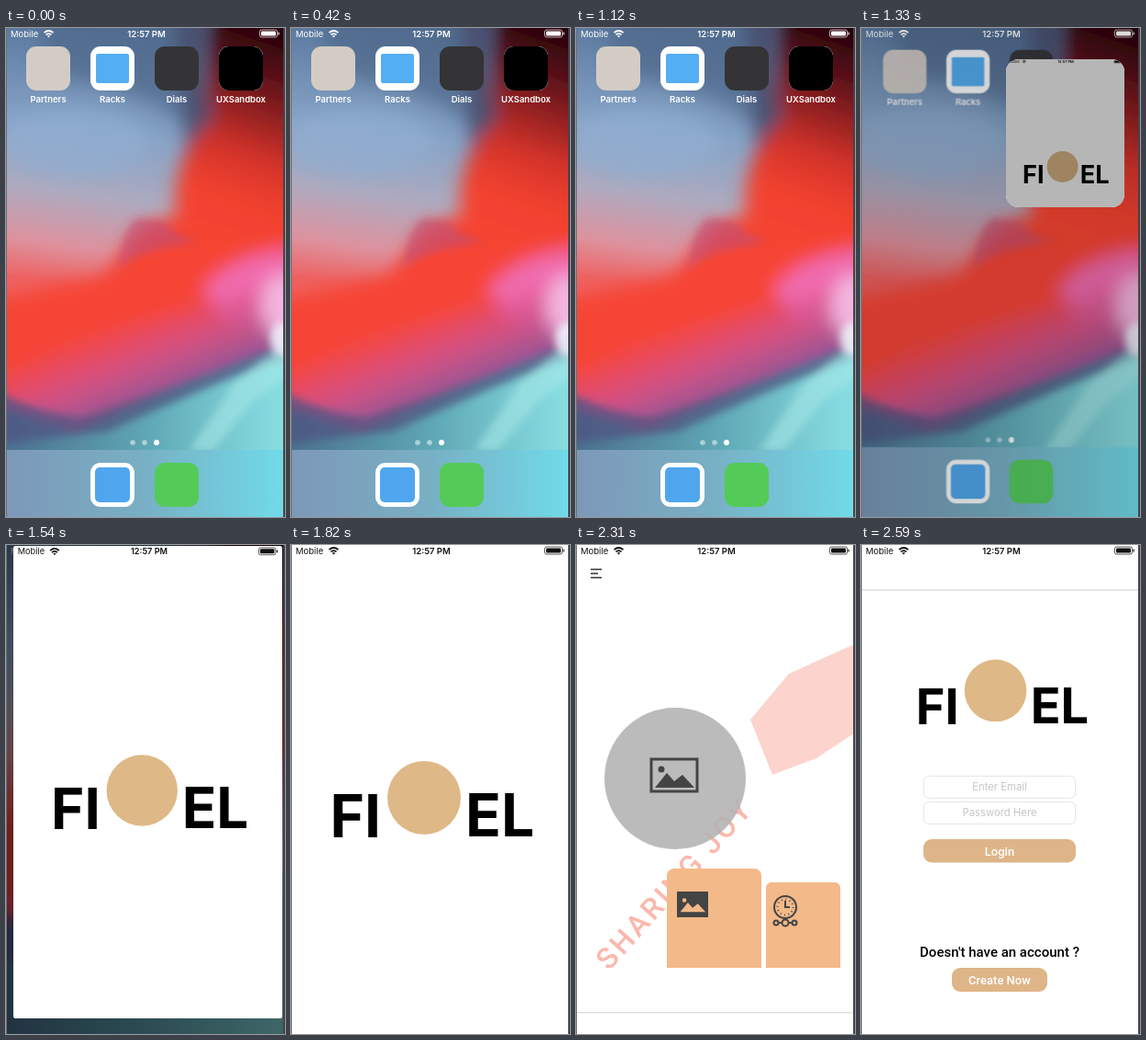
An HTML page without scripts that plays this animation: 304x532 px, repeating every 3220 ms.

```html
<!DOCTYPE html>
<html lang="en">
<head>
<meta charset="utf-8">
<title>App launch</title>
<style>
  html, body { margin: 0; width: 100%; height: 100%; overflow: hidden; background: #fff; }
  .stage { position: relative; width: 304px; height: 532px; overflow: hidden; }
  .stage > *, .window > * { position: absolute; }
  svg { display: block; left: 0; top: 0; }
  text { font-family: Inter, "Liberation Sans", sans-serif; }

  .icons, .dim, .window, .veil, .page, .login { animation: 3220ms linear infinite; }

  .icons { transform-origin: 152px 266px; animation-name: recede; }
  .dim { inset: 0; background: #000; animation-name: dim; }
  .window { overflow: hidden; background: #fff; animation-name: open; }
  .window svg { width: 100%; height: 100%; }
  .veil { inset: 0; background: #000; animation-name: unveil; }
  .page { animation-name: appear; }
  .login { animation-name: rise; }
  .edge { top: 0; height: 100%; }
  .left { left: 0; width: 1px; background: #6c7078; }
  .right { right: 0; width: 2px; background: #45424a; }

  .label { font-size: 9.5px; font-weight: 600; fill: #fff; text-anchor: middle; }
  .status { font-size: 9.5px; }
  .brand { font: 700 64px Lato, sans-serif; }
  .din { font-family: Roboto, sans-serif; font-weight: 500; }
  .mid { text-anchor: middle; }

  @keyframes recede {
    0%, 36.957% { transform: none; opacity: 1; }
    41.304% { transform: scale(.985); opacity: .95; }
    47.826%, 100% { transform: scale(.93); opacity: 0; }
  }
  @keyframes dim {
    0%, 36.957% { opacity: 0; }
    41.304% { opacity: .14; }
    47.826%, 100% { opacity: .54; }
  }
  @keyframes open {
    0%, 36.957% { left: 232px; top: 20px; width: 48px; height: 48px; border-radius: 11px;
      animation-timing-function: ease-in; }
    41.304% { left: 159px; top: 34px; width: 128px; height: 159px; border-radius: 14px; }
    47.826% { left: 8px; top: 1px; width: 293px; height: 514px; border-radius: 3px;
      animation-timing-function: ease-out; }
    54.348%, 100% { left: 0; top: 0; width: 303px; height: 532px; border-radius: 0; }
  }
  @keyframes unveil {
    0%, 36.957% { opacity: 1; }
    41.304% { opacity: .29; }
    45.652%, 100% { opacity: 0; }
  }
  @keyframes appear {
    0%, 63.043% { opacity: 0; }
    65.217% { opacity: .22; }
    71.739%, 100% { opacity: 1; }
  }
  @keyframes rise {
    0%, 70.807% { transform: translateY(532px); animation-timing-function: cubic-bezier(.3, .3, .2, 1); }
    80.435%, 100% { transform: none; }
  }
</style>
</head>
<body>
<div class="stage">
  <svg width="304" height="532" viewBox="0 0 304 532">
    <defs>
      <filter id="soft" x="-20%" y="-20%" width="140%" height="140%"><feGaussianBlur stdDeviation="10"/></filter>
      <filter id="fine" x="-20%" y="-20%" width="140%" height="140%"><feGaussianBlur stdDeviation="4"/></filter>
      <linearGradient id="sky" gradientUnits="userSpaceOnUse" x1="110" y1="0" x2="70" y2="280">
        <stop offset="0" stop-color="#56749a"/>
        <stop offset=".4" stop-color="#86a3c6"/>
        <stop offset=".65" stop-color="#aeaabf"/>
        <stop offset=".85" stop-color="#dd929e"/>
        <stop offset="1" stop-color="#ee6262"/>
      </linearGradient>
      <linearGradient id="fire" gradientUnits="userSpaceOnUse" x1="300" y1="0" x2="215" y2="250">
        <stop offset="0" stop-color="#220009"/>
        <stop offset=".2" stop-color="#581019"/>
        <stop offset=".55" stop-color="#d6342b"/>
        <stop offset=".75" stop-color="#f3432f"/>
        <stop offset="1" stop-color="#f64434"/>
      </linearGradient>
      <linearGradient id="dusk" gradientUnits="userSpaceOnUse" x1="135" y1="305" x2="175" y2="405">
        <stop offset="0" stop-color="#e04f80" stop-opacity="0"/>
        <stop offset=".5" stop-color="#d4528c" stop-opacity=".85"/>
        <stop offset="1" stop-color="#86589c"/>
      </linearGradient>
      <linearGradient id="sea">
        <stop offset=".1" stop-color="#4c7290"/>
        <stop offset=".5" stop-color="#5ea6b4"/>
        <stop offset=".9" stop-color="#86dce0"/>
      </linearGradient>
      <linearGradient id="dock">
        <stop offset="0" stop-color="#7d97b8"/>
        <stop offset=".5" stop-color="#78b0c4"/>
        <stop offset="1" stop-color="#70dcea"/>
      </linearGradient>

      <g id="status" class="status" fill="currentColor">
        <text x="5" y="9.5">Mobile</text>
        <path d="M41.5 5.2Q46.5 .8 51.5 5.2M43.5 7.4Q46.5 4.8 49.5 7.4" fill="none" stroke="currentColor" stroke-width="1.7"/>
        <path d="M44.9 8.7Q46.5 7.4 48.1 8.7L46.5 10.4Z"/>
        <text class="mid" x="153" y="9.5" font-weight="600">12:57 PM</text>
        <rect x="276.5" y="2" width="19" height="8" rx="2" fill="none" stroke="currentColor" stroke-width=".7"/>
        <rect x="278" y="3.4" width="16" height="5.2" rx="1"/>
        <rect x="296.5" y="4.5" width="1.2" height="3" rx=".6"/>
      </g>

      <g id="brand" class="brand">
        <text x="98" y="318" text-anchor="end">FI</text>
        <circle cx="145" cy="275" r="40" fill="#deb887"/>
        <text x="190" y="317">EL</text>
      </g>

      <g id="picture">
        <path d="M4 30L17 14L25 23L34 16L47 30Z"/>
        <circle cx="11" cy="10" r="3.5"/>
      </g>
      <rect id="tile" width="48" height="48" rx="11"/>
    </defs>

    <rect width="304" height="532" fill="url(#sky)"/>
    <g filter="url(#soft)">
      <path d="M40 -30H200V110Q150 60 40 50Z" fill="#50688a" opacity=".7"/>
      <ellipse cx="75" cy="125" rx="80" ry="38" fill="#90aed2" opacity=".7"/>
      <path d="M-40 300L105 270L150 215L185 205Q178 150 218 100L222 -30H340V370L180 400Q90 430 -40 415Z" fill="url(#fire)"/>
      <path d="M180 -30H222Q204 50 226 95L196 135Q196 60 180 -30Z" fill="#49506f"/>
      <path d="M215 285Q250 238 340 240V335L240 320Z" fill="#f06cae"/>
      <path d="M-40 400L60 345L210 300L340 270V350L190 400L60 445L-40 425Z" fill="url(#dusk)"/>
      <ellipse cx="302" cy="302" rx="24" ry="34" fill="#f3b6e0"/>
    </g>
    <g filter="url(#fine)">
      <path d="M122 262Q128 212 145 207L172 210Q185 228 212 232Q170 238 150 246Q135 250 122 262Z" fill="#c44f74" opacity=".65"/>
      <path d="M330 338Q210 375 75 440L-30 405V570H330Z" fill="url(#sea)"/>
      <path d="M-30 385Q30 418 80 424Q190 390 330 332V348Q210 395 110 440L-30 455Z" fill="#4f5582" opacity=".75"/>
      <path d="M312 335L250 385L200 460H225L270 405L312 375Z" fill="#a5e8e8" opacity=".6"/>
      <ellipse cx="302" cy="338" rx="14" ry="18" fill="#eef0fa" opacity=".9"/>
    </g>

    <g class="icons">
      <rect x="-6" y="459" width="316" height="80" fill="url(#dock)"/>
      <use href="#tile" x="22" y="20" fill="#d3ccc5"/>
      <use href="#tile" x="92" y="20" fill="#fff"/>
      <rect x="98" y="28" width="36" height="32" rx="2" fill="#54aef3"/>
      <use href="#tile" x="162" y="20" fill="#343436"/>
      <use href="#tile" x="92" y="473" fill="#fff"/>
      <rect x="97" y="478" width="38" height="38" rx="5" fill="#4fa6ee"/>
      <use href="#tile" x="162" y="473" fill="#54cb58"/>
      <g class="label">
        <text x="46" y="81">Partners</text>
        <text x="116" y="81">Racks</text>
        <text x="186" y="81">Dials</text>
        <text x="256" y="81">UXSandbox</text>
      </g>
      <g fill="#fff">
        <circle cx="138" cy="451" r="2.8" opacity=".5"/>
        <circle cx="151" cy="451" r="2.8" opacity=".5"/>
        <circle cx="164" cy="451" r="3"/>
      </g>
    </g>
    <use href="#status" color="#fff"/>
  </svg>

  <div class="dim"></div>

  <div class="window">
    <svg viewBox="0 0 303 532" preserveAspectRatio="xMidYMin slice">
      <rect width="303" height="532" fill="#fff"/>
      <use href="#brand"/>

      <g class="page">
        <rect width="303" height="532" fill="#fff"/>
        <g fill="#fbb8ac">
          <path d="M190 190L232 140L303 108V205L262 232L214 250Z" opacity=".6"/>
          <text class="din" transform="translate(36 464) rotate(-48)" font-size="32" letter-spacing="3">SHARING JOY</text>
        </g>
        <circle cx="108" cy="254" r="77" fill="#b4b4b4" opacity=".9"/>
        <path d="M16 26.5H28M16 31H24M16 35.5H28" stroke="#333" stroke-width="1.5"/>
        <g fill="#444">
          <rect x="82" y="233" width="50" height="35" fill="none" stroke="#444" stroke-width="3"/>
          <use href="#picture" x="82" y="234"/>
        </g>
        <rect x="99" y="352" width="103" height="140" rx="8" fill="#f3b988"/>
        <rect x="207" y="367" width="81" height="120" rx="6" fill="#f3b988"/>
        <rect x="110" y="377" width="34" height="28" fill="#444"/>
        <use href="#picture" transform="translate(111 380) scale(.64)" fill="#f3b988"/>
        <g fill="none" stroke="#444" stroke-width="2">
          <circle cx="228" cy="394" r="12"/>
          <circle cx="228" cy="394" r="8.5" stroke-dasharray="1 3.45"/>
          <path d="M228 387V394H233M221 411H224M232 411H235"/>
          <circle cx="218" cy="411" r="2.5"/>
          <circle cx="228" cy="411" r="3.5"/>
          <circle cx="238" cy="411" r="2.5"/>
        </g>
        <g fill="#333">
          <text class="din" x="108" y="482" font-size="14.5">Album</text>
          <text class="din" x="213" y="471" font-size="11">Timeline</text>
        </g>
      </g>

      <g class="login">
        <rect width="303" height="532" fill="#fff"/>
        <rect y="48.5" width="303" height="1" fill="#cfcfcf"/>
        <use href="#brand" transform="translate(23.9 -74.2) scale(.846)"/>
        <g fill="#fff" stroke="#e6e6e6">
          <rect x="68.5" y="251.5" width="165" height="24" rx="5"/>
          <rect x="68.5" y="279.5" width="165" height="24" rx="5"/>
        </g>
        <g class="mid" fill="#c6c6c9" font-size="11.3">
          <text x="151" y="267">Enter Email</text>
          <text x="151" y="295">Password Here</text>
        </g>
        <g fill="#deb588">
          <rect x="68" y="320" width="166" height="25.5" rx="9"/>
          <rect x="99" y="460" width="104" height="26" rx="9"/>
        </g>
        <g class="mid" fill="#fff" font-size="13">
          <text class="din" x="151" y="337.5">Login</text>
          <text class="din" x="151" y="478">Create Now</text>
        </g>
        <text class="din mid" x="151" y="448" font-size="15">Doesn't have an account ?</text>
      </g>

      <use href="#status" color="#111"/>
    </svg>
    <div class="veil"></div>
  </div>

  <div class="edge left"></div>
  <div class="edge right"></div>
</div>
</body>
</html>
```
